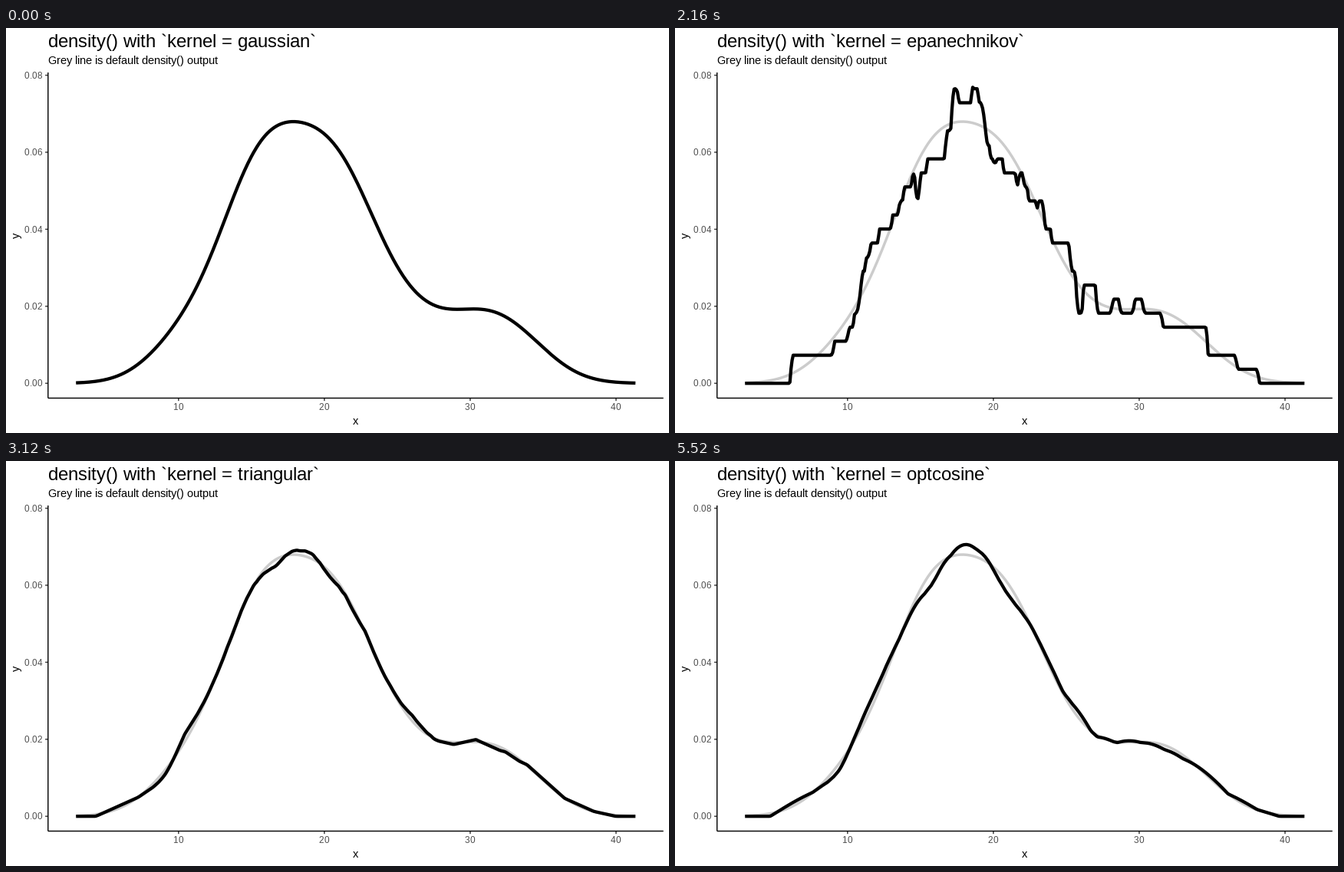
Animation, 864 px wide and 528 px high, one loop 6720 ms. Source, as a matplotlib script:

```python
import numpy as np
import matplotlib.pyplot as plt
from matplotlib.animation import FuncAnimation
from matplotlib.textpath import TextPath

W, H, DPI = 864, 528, 72
STEP_MS, FRAMES = 80, 84
LEFT, RIGHT, TOP, BOTTOM = 54.8, 856.7, 58.0, 482.5
TITLE, BODY, SMALL = 24, 14.67, 11.73
AXIS_LW, TICK = 1.42, 3.67

plt.rcParams["font.family"] = "Liberation Sans"

SAMPLE = np.array([
    21, 21, 22.8, 21.4, 18.7, 18.1, 14.3, 24.4, 22.8, 19.2, 17.8,
    16.4, 17.3, 15.2, 10.4, 10.4, 14.7, 32.4, 30.4, 33.9, 21.5, 15.5,
    15.2, 13.3, 19.2, 27.3, 26, 30.4, 15.8, 19.7, 15, 21.4])

# name: (half-width in bandwidths, kernel shape on [-1, 1])
KERNELS = {
    "gaussian": (1, lambda u: np.exp(-u * u / 2) / np.sqrt(2 * np.pi)),
    "epanechnikov": (np.sqrt(5), lambda u: 0.75 * (1 - u**2)),
    "rectangular": (np.sqrt(3), lambda u: 0.5 + 0 * u),
    "triangular": (np.sqrt(6), lambda u: 1 - np.abs(u)),
    "biweight": (np.sqrt(7), lambda u: 15 / 16 * (1 - u**2)**2),
    "cosine": (1 / np.sqrt(1 / 3 - 2 / np.pi**2),
               lambda u: (1 + np.cos(np.pi * u)) / 2),
    "optcosine": (1 / np.sqrt(1 - 8 / np.pi**2),
                  lambda u: np.pi / 4 * np.cos(np.pi * u / 2)),
}
SWITCHES = [16, 27, 38, 48, 58, 68]


def bandwidth(data):
    q1, q3 = np.percentile(data, [25, 75])
    spread = min(data.std(ddof=1), (q3 - q1) / 1.34)
    return 0.9 * spread * len(data) ** -0.2


BW = bandwidth(SAMPLE)
N = 512
GRID = np.linspace(SAMPLE.min() - 3 * BW, SAMPLE.max() + 3 * BW, N)


def density(name):
    """Kernel density by linear binning and circular convolution."""
    lo, hi = GRID[0] - 4 * BW, GRID[-1] + 4 * BW
    pos = (SAMPLE - lo) / (hi - lo) * (N - 1)
    cell = pos.astype(int)
    part = pos - cell
    bins = np.zeros(2 * N)
    np.add.at(bins, cell, (1 - part) / len(SAMPLE))
    np.add.at(bins, cell + 1, part / len(SAMPLE))

    lag = np.linspace(0, 2 * (hi - lo), 2 * N)
    lag[N + 1:] = -lag[N - 1:0:-1]
    width, shape = KERNELS[name]
    u = lag / (width * BW)
    kern = shape(u) / (width * BW)
    if name != "gaussian":
        kern = np.where(np.abs(u) < 1, kern, 0)

    conv = np.fft.ifft(np.fft.fft(bins) * np.conj(np.fft.fft(kern))).real
    return np.interp(GRID, np.linspace(lo, hi, N), np.maximum(conv[:N], 0))


curves = [density(name) for name in KERNELS]
y_max = max(c.max() for c in curves)
x_span = GRID[-1] - GRID[0]


def px(x):
    return LEFT + (RIGHT - LEFT) * ((x - GRID[0]) / x_span + 0.05) / 1.1


def py(y):
    return BOTTOM - (BOTTOM - TOP) * (y / y_max + 0.05) / 1.1


fig = plt.figure(figsize=(W / DPI, H / DPI), dpi=DPI, facecolor="white")
ax = fig.add_axes([0, 0, 1, 1])
ax.set_xlim(0, W)
ax.set_ylim(H, 0)
ax.axis("off")


def stroke(xs, ys, color, width, z):
    return ax.plot(xs, ys, color=color, lw=width, zorder=z, snap=False,
                   solid_capstyle="butt", solid_joinstyle="round")[0]


def advance(char, size):
    """Glyph advance rounded to whole pixels."""
    def ink(s):
        return TextPath((0, 0), s, size=size).get_extents().width
    return round(ink(f"|{char}|") - ink("||"))


def label(x, y, text, size, color="black", align=0.0):
    """Set text on the pixel grid; align is 0 left, 0.5 centre, 1 right."""
    steps = [advance(c, size) for c in text]
    pen = round(x - align * sum(steps))
    glyphs = []
    for char, step in zip(text, steps):
        if char != " ":
            # nearly half a pixel back, so the renderer rounds down
            glyphs.append(ax.text(pen - 0.49, y, char, fontsize=size,
                                  color=color, va="baseline"))
        pen += step
    return glyphs


# Axes
for tick in (10, 20, 30, 40):
    stroke([px(tick)] * 2, [BOTTOM, BOTTOM + TICK], "#333333", AXIS_LW, 1)
    label(px(tick), 498, str(tick), SMALL, "#4d4d4d", 0.5)
for tick in (0, 0.02, 0.04, 0.06, 0.08):
    stroke([LEFT - TICK, LEFT], [py(tick)] * 2, "#333333", AXIS_LW, 1)
    label(48.2, py(tick) + 4.2, f"{tick:.2f}", SMALL, "#4d4d4d", 1)
stroke([LEFT, LEFT], [TOP, BOTTOM], "black", AXIS_LW, 2)
stroke([LEFT, RIGHT], [BOTTOM, BOTTOM], "black", AXIS_LW, 2)

# Titles
titles = [label(LEFT, 25, f"density() with `kernel = {name}`", TITLE)
          for name in KERNELS]
label(LEFT, 47, "Grey line is default density() output", BODY)
label((LEFT + RIGHT) / 2, 517, "x", BODY, align=0.5)
ax.text(17.5, (TOP + BOTTOM) / 2, "y", fontsize=BODY, ha="center",
        va="baseline", rotation=90, rotation_mode="anchor")

# Curves
stroke(px(GRID), py(curves[0]), "#cccccc", 3.45, 3)
curve = stroke(px(GRID), py(curves[0]), "black", 4.27, 4)


def stage(frame):
    return sum(frame >= s for s in SWITCHES)


def update(frame):
    # The title follows the curve one step late
    curve.set_ydata(py(curves[stage(frame)]))
    for i, glyphs in enumerate(titles):
        for glyph in glyphs:
            glyph.set_visible(i == stage(frame - 1))
    return [curve]


def reset():
    return update(0)


anim = FuncAnimation(fig, update, frames=FRAMES, init_func=reset,
                     interval=STEP_MS, repeat=True, repeat_delay=0,
                     blit=False)
plt.show()
```
